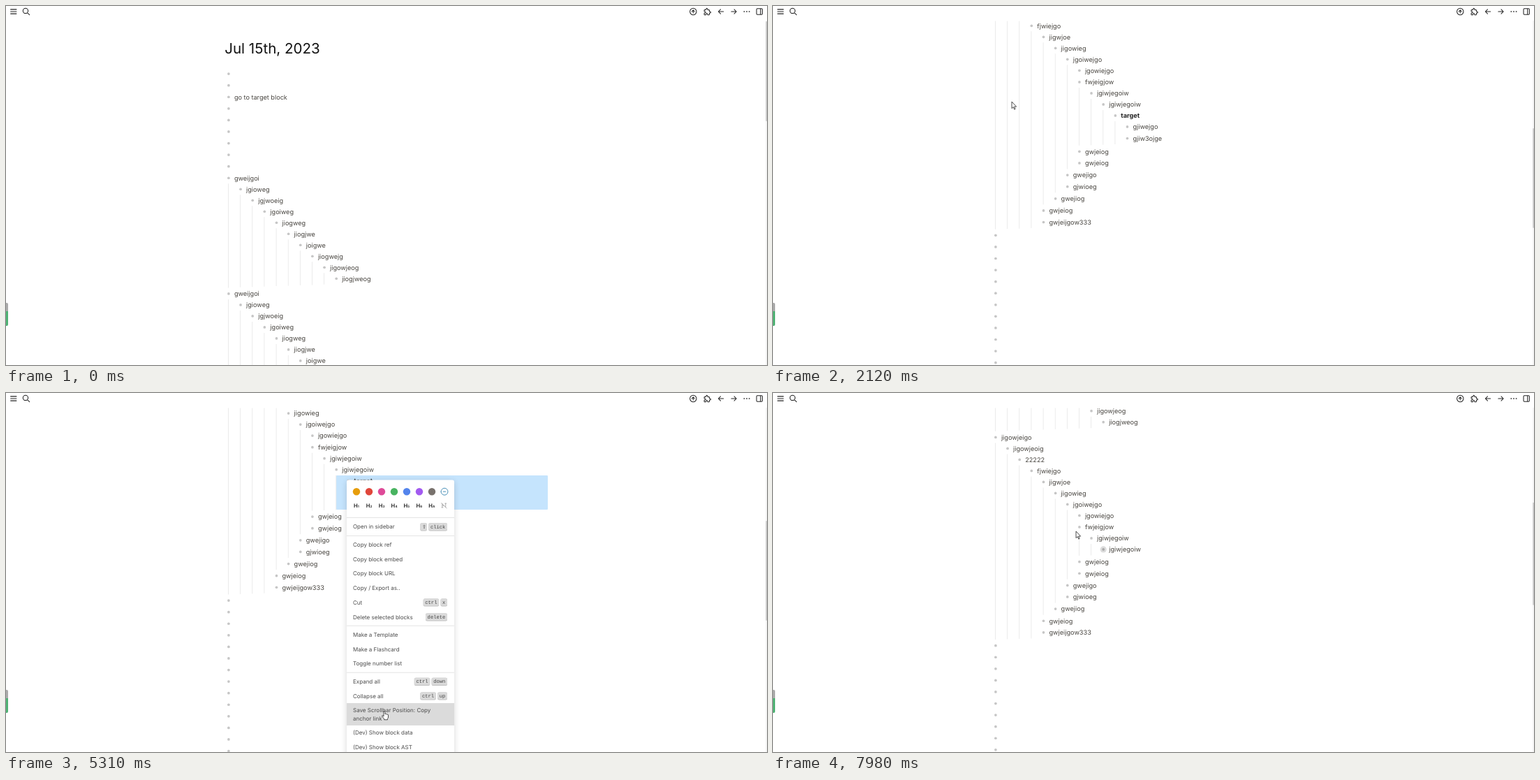
An HTML page with a canvas that plays this animation: 1090x514 px, repeating every 8 s.

```html
<!DOCTYPE html>
<html lang="en">
<head>
<meta charset="utf-8">
<title>Outline</title>
<style>
  html, body { margin: 0; width: 100%; height: 100%; overflow: hidden; background: #fff; }
  canvas { display: block; width: 1090px; height: 514px; }
</style>
</head>
<body>
<canvas id="stage"></canvas>
<script>
const W = 1090, H = 514, LOOP = 8000;
const PX = 4 / 7;               // stage pixels per layout pixel
const INDENT = 30 * PX, ROW = 28 * PX, TICK = 100 * PX, TOP = 21.5;
const SANS = 'Inter, sans-serif', MONO = '"Liberation Mono", monospace';

const canvas = document.getElementById('stage');
const dpr = window.devicePixelRatio || 1;
canvas.width = W * dpr;
canvas.height = H * dpr;
const ctx = canvas.getContext('2d');

// ---------- outline ----------
const chain = 'gweijgoi jgioweg jgjwoeig jgoiweg jiogweg jiogjwe joigwe jiogwejg jigowjeog jiogjweog'
  .split(' ').map((text, depth) => ({ text, depth }));
const empties = n => Array.from({ length: n }, () => ({ text: '', depth: 0 }));
const tree = `0 jigowjeigo,1 jigowjeoig,2 22222,3 fjwiejgo,4 jigwjoe,5 jigowieg,6 jgoiwejgo,
7 jgowiejgo,7 fwjeigjow,8 jgiwjegoiw,9 jgiwjegoiw,10 target,11 gjiwejgo,11 gjiw3ojge,
7 gwjeiog,7 gwjeiog,6 gwejigo,6 gjwioeg,5 gwejiog,4 gwjeiog,4 gwjeijgow333`
  .split(',').map(s => {
    const [depth, text] = s.trim().split(' ');
    return { text, depth: +depth };
  });
const blocks = [
  ...empties(2), { text: 'go to target block', depth: 0 }, ...empties(6),
  ...chain, ...chain, ...tree, ...empties(32)
];

// Every closed block adds one layout pixel below itself.
function layout(list) {
  let y = 97.1;
  const rows = list.map((b, i) => {
    const row = { ...b, y };
    const next = list[i + 1];
    if (next) y += ROW + Math.max(0, b.depth - next.depth + 1) * PX;
    return row;
  });
  const guides = [];
  rows.forEach((r, i) => {
    let j = i;
    while (rows[j + 1] && rows[j + 1].depth > r.depth) j++;
    if (j > i) {
      guides.push({
        x: 318.5 + r.depth * INDENT,
        y1: r.y + ROW / 2,
        y2: rows[j].y + ROW / 2 + (rows[j].depth - r.depth) * PX
      });
    }
  });
  return { rows, guides };
}
const opened = layout(blocks);
const folded = layout(blocks.filter(b => b.depth < 10));
folded.rows.find(r => r.depth === 9 && r.text === 'jgiwjegoiw').closed = true;

// ---------- motion ----------
const scrollKeys = [
  [970, 0], [1250, 4], [1390, 4], [1790, 8], [1830, 8], [2230, 11], [6100, 11], [6460, 9]
];
const cursorKeys = [
  [120, 886, 421], [320, 342, 137], [2280, 342, 137], [2680, 414, 123], [3390, 488, 124],
  [3860, 488, 124], [4450, 535, 350], [4520, 535, 352], [4960, 541, 455], [5500, 541, 455],
  [5850, 505, 300], [6120, 505, 300], [6480, 480, 232], [6680, 480, 232], [6910, 472, 228],
  [7050, 461, 221], [7300, 461, 221], [7960, 434, 198]
];
const clamp = v => Math.min(1, Math.max(0, v));

function track(keys, t) {
  if (t <= keys[0][0]) return keys[0].slice(1);
  const i = keys.findIndex(k => k[0] > t);
  if (i < 0) return keys[keys.length - 1].slice(1);
  const a = keys[i - 1], b = keys[i];
  const u = (t - a[0]) / (b[0] - a[0]), e = u * u * (3 - 2 * u);
  return a.slice(1).map((v, n) => v + (b[n + 1] - v) * e);
}

// ---------- drawing helpers ----------
function text(str, x, y, size, color, weight = 400, family = SANS) {
  ctx.font = `${weight} ${size}px ${family}`;
  ctx.fillStyle = color;
  ctx.fillText(str, x, y);
}
function box(x, y, w, h, color, r = 0) {
  ctx.fillStyle = color;
  ctx.beginPath();
  ctx.roundRect(x, y, w, h, r);
  ctx.fill();
}
function dot(x, y, r, color) {
  ctx.fillStyle = color;
  ctx.beginPath();
  ctx.arc(x, y, r, 0, 7);
  ctx.fill();
}
function panel(x, y, w, h, color, blur, alpha) {
  ctx.save();
  ctx.shadowColor = `rgba(0,0,0,${alpha})`;
  ctx.shadowBlur = blur * dpr;
  ctx.shadowOffsetY = 2 * dpr;
  box(x, y, w, h, color, 3);
  ctx.restore();
}
// Icons live on a 24 unit grid centred on x, y.
function icon(path, x, y, color = '#222', scale = 0.52, width = 2) {
  ctx.save();
  ctx.translate(x, y);
  ctx.scale(scale, scale);
  ctx.translate(-12, -12);
  ctx.strokeStyle = color;
  ctx.lineWidth = width;
  ctx.lineCap = ctx.lineJoin = 'round';
  ctx.stroke(path);
  ctx.restore();
}

const circle = 'M3 12a9 9 0 1 0 18 0a9 9 0 1 0-18 0';
const glyphs = {
  menu: 'M4 6h16M4 12h16M4 18h16',
  search: 'M3 10a7 7 0 1 0 14 0a7 7 0 1 0-14 0M21 21l-6-6',
  up: circle + 'M12 8l-4 4M12 8v8M16 12l-4-4',
  puzzle: 'M4 7h3a1 1 0 0 0 1-1v-1a2 2 0 0 1 4 0v1a1 1 0 0 0 1 1h3a1 1 0 0 1 1 1v3a1 1 0 0 0 1 1h1' +
    'a2 2 0 0 1 0 4h-1a1 1 0 0 0-1 1v3a1 1 0 0 1-1 1h-3a1 1 0 0 1-1-1v-1a2 2 0 0 0-4 0v1' +
    'a1 1 0 0 1-1 1h-3a1 1 0 0 1-1-1v-3a1 1 0 0 1 1-1h1a2 2 0 0 0 0-4h-1a1 1 0 0 1-1-1v-3a1 1 0 0 1 1-1',
  left: 'M5 12h14M5 12l6 6M5 12l6-6',
  right: 'M5 12h14M13 18l6-6M13 6l6 6',
  dots: 'M4.5 12h1M11.5 12h1M18.5 12h1',
  side: 'M6 4h12a2 2 0 0 1 2 2v12a2 2 0 0 1-2 2H6a2 2 0 0 1-2-2V6a2 2 0 0 1 2-2M15 4v16',
  check: circle + 'M9 12l2 2l4-4',
  minus: circle + 'M9 12h6',
  close: 'M6 6l12 12M18 6l-12 12',
  noHead: 'M7 18V7M17 17V6M7 12h5M4 5l16 15M5 18h4M15 6h4'
};
for (const k in glyphs) glyphs[k] = new Path2D(glyphs[k]);

const arrow = new Path2D('M0 0V9.6L2.2 7.6L3.7 11.1L5.1 10.5L3.6 7.1H6.6Z');
const hand = new Path2D('M0 .9Q1-.5 2 .9V4.6Q3 4 3.6 4.9Q4.6 4.4 5.1 5.3Q6.4 4.9 6.5 6.2V9' +
  'Q6.4 10.6 5.5 11.4V12.8H.6V11.6L-2.4 7.9Q-2.7 6.5-1.3 6.9L0 8Z');
function pointer(shape, x, y) {
  ctx.save();
  ctx.translate(x, y);
  ctx.fillStyle = '#fff';
  ctx.strokeStyle = '#222';
  ctx.lineWidth = 0.8;
  ctx.lineJoin = 'round';
  ctx.fill(shape);
  ctx.stroke(shape);
  ctx.restore();
}

// ---------- page ----------
function drawPage(doc, scroll, selected) {
  ctx.save();
  ctx.beginPath();
  ctx.rect(0, TOP, W, H - TOP);
  ctx.clip();
  if (selected) box(473, 118, 303, 49, '#c5e4fd', 1);
  ctx.translate(0, -scroll);
  text('Jul 15th, 2023', 313.2, 67.5, 36 * PX, '#111');
  for (const g of doc.guides) box(g.x - 0.4, g.y1, 0.8, g.y2 - g.y1, '#e6e6e6');
  for (const r of doc.rows) {
    const x = 318.9 + r.depth * INDENT;
    if (r.closed) dot(x, r.y, 4.6, '#dcdcdc');
    dot(x, r.y, 1.85, r.closed ? '#aaa' : '#c6c6c6');
    const bold = r.text === 'target';
    text(r.text, x + 8, r.y + 3.3, 16 * PX, bold ? '#222' : '#494641', bold ? 700 : 400);
  }
  ctx.restore();
}

function drawChrome(doc, scroll) {
  icon(glyphs.menu, 10.8, 8);
  icon(glyphs.search, 29, 8);
  icon(glyphs.up, 984.3, 8);
  icon(glyphs.puzzle, 1004.8, 8);
  icon(glyphs.left, 1024, 8);
  icon(glyphs.right, 1042.5, 8);
  icon(glyphs.dots, 1061, 8, '#222', 0.52, 2.8);
  icon(glyphs.side, 1079.2, 8);
  const short = doc === folded;
  box(1088, 21, 2, H - 21, '#f4f4f4');
  box(1088.3, 22 + scroll * (short ? 0.262 : 0.256), 1.7, short ? 147 : 143, '#c8c8c8', 0.8);
  box(0, 425, 3, 12, '#aaa', [0, 2, 0, 0]);
  box(0, 437, 3, 21, '#4fb274', [0, 0, 2, 0]);
}

// ---------- context menu ----------
const items = [
  [191.5, 'Open in sidebar', '⇧ click'], [217, 'Copy block ref'], [237.6, 'Copy block embed'],
  [258.2, 'Copy block URL'], [278.8, 'Copy / Export as..'], [299.6, 'Cut', 'ctrl x'],
  [320.6, 'Delete selected blocks', 'delete'], [346.2, 'Make a Template'],
  [366.8, 'Make a Flashcard'], [387.4, 'Toggle number list'], [413, 'Expand all', 'ctrl down'],
  [433.6, 'Collapse all', 'ctrl up'], [460, 'Save Scrollbar Position: Copy|anchor link'],
  [486.2, '(Dev) Show block data'], [506.8, '(Dev) Show block AST']
];
const half = label => label.includes('|') ? 16 : 10.3;
const swatches = ['#e69d0c', '#e0463a', '#de4a98', '#48b360', '#5384ec', '#a25af0', '#78716c'];

function hovered(x, y) {
  return x > 492 ? items.find(([cy, label]) => Math.abs(y - cy) <= half(label)) : undefined;
}

function drawKeys(keys, cy) {
  let right = 632;
  for (const key of keys.split(' ').reverse()) {
    const w = key.length * 4.3 + 5.2;
    box(right - w, cy - 5.2, w, 11.2, '#b9b9b9', 2);
    box(right - w, cy - 5.2, w, 10.4, '#dadada', 2);
    text(key, right - w + 2.6, cy + 2.4, 7.15, '#444', 400, MONO);
    right -= w + 2.4;
  }
}

function drawMenu(alpha, active) {
  ctx.save();
  ctx.globalAlpha = alpha;
  panel(488, 124.5, 154, 410, '#fff', 9, 0.16);
  swatches.forEach((c, i) => dot(502 + i * 18, 141.2, 5.2, c));
  icon(glyphs.minus, 628, 141.2, '#4a90b8', 0.55, 1.8);
  [...'123456A'].forEach((n, i) => {
    const x = 497.9 + i * 17.9;
    text('H', x, 163.8, 7.6, '#333', 700);
    text(n, x + 5.8, 164, 4.6, '#333', 700);
  });
  icon(glyphs.noHead, 627.3, 161, '#999', 0.48, 1.6);
  for (const y of [178.5, 204.5, 333.2, 400.2]) box(488, y - 0.4, 154, 0.9, '#e4e4e4');
  for (const item of items) {
    const [cy, label, keys] = item;
    if (item === active) box(488, cy - half(label), 154, half(label) * 2, '#dbdbdb');
    const lines = label.split('|');
    lines.forEach((s, i) =>
      text(s, 497, cy + 2.9 + (i - (lines.length - 1) / 2) * 11.4, 14 * PX, '#4c4c4c'));
    if (keys) drawKeys(keys, cy);
  }
  ctx.restore();
}

function drawToast(alpha) {
  ctx.save();
  ctx.globalAlpha = alpha;
  panel(861.5, 30.5, 218.5, 33, '#e9e9e9', 8, 0.16);
  icon(glyphs.check, 876, 45, '#333', 0.53, 1.9);
  text('Copy success', 888, 48, 14 * PX, '#444');
  icon(glyphs.close, 1066, 44.8, '#777', 0.5, 1.5);
  ctx.restore();
}

// ---------- timeline ----------
function draw(t) {
  ctx.setTransform(dpr, 0, 0, dpr, 0, 0);
  ctx.textRendering = 'geometricPrecision';
  ctx.fillStyle = '#fff';
  ctx.fillRect(0, 0, W, H);

  const doc = t < 7250 ? opened : folded;
  const scroll = track(scrollKeys, t)[0] * TICK;
  const [x, y] = track(cursorKeys, t);
  const menuOpen = t >= 3650 && t < 5490;
  const active = menuOpen ? hovered(x, y) : undefined;

  drawPage(doc, scroll, menuOpen);
  drawChrome(doc, scroll);
  if (menuOpen) drawMenu(clamp((t - 3610) / 120), active);
  if (t >= 5490 && t < 7050) drawToast(t < 6980 ? clamp((t - 5490) / 340) : 0.4);
  if (t >= 120) pointer(active ? hand : arrow, x, y);
}

function frame(now) {
  draw((now - start) % LOOP);
  requestAnimationFrame(frame);
}
const start = performance.now();
draw(0);
requestAnimationFrame(now => frame(Math.max(now, start)));
</script>
</body>
</html>
```
